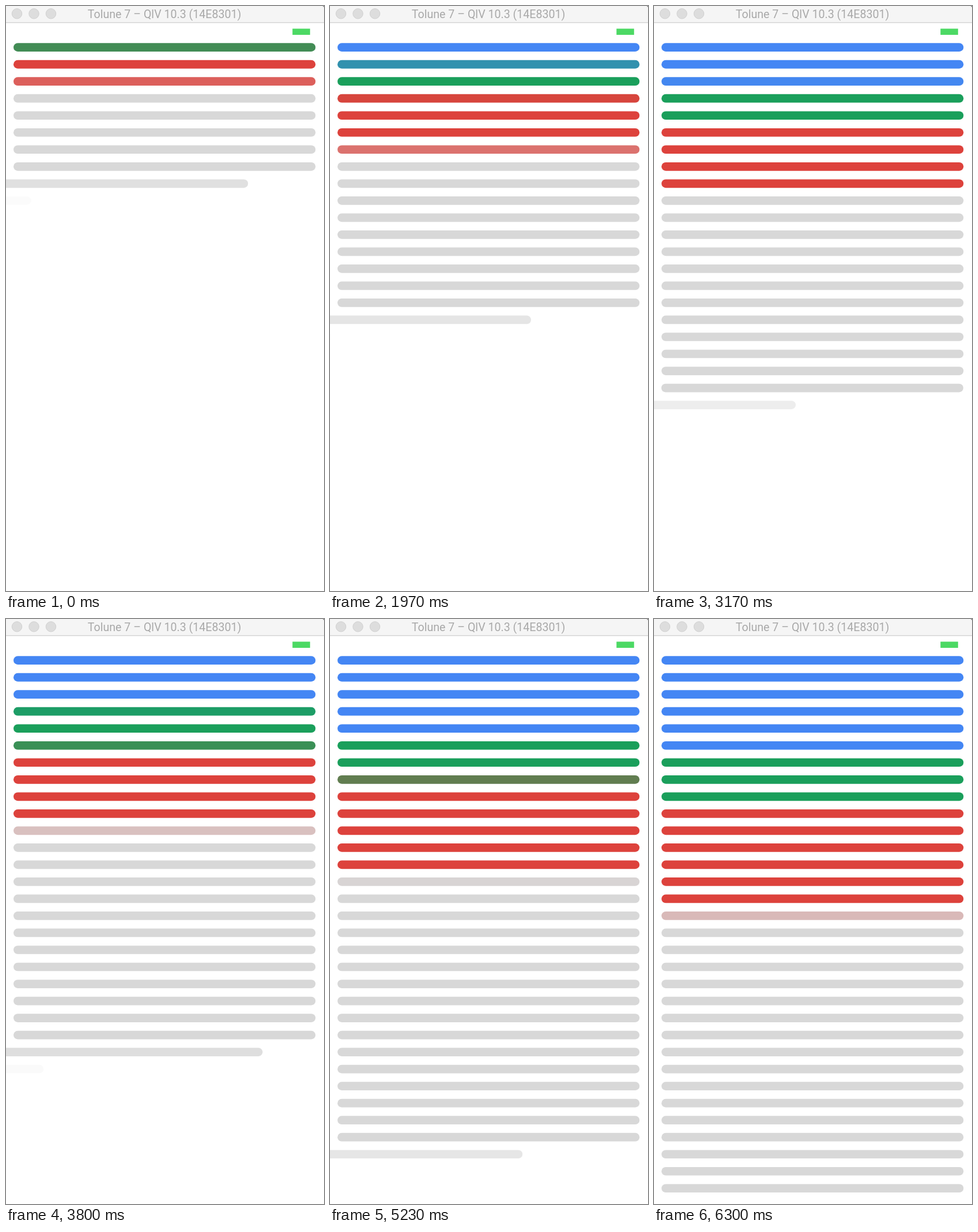
Write an HTML page with a canvas that moves like this. It is 552x1014 px and loops after 6.36 s.

```html
<!DOCTYPE html>
<html lang="en">
<head>
<meta charset="utf-8">
<title>Staggered bars</title>
<style>
  html, body { margin: 0; width: 100%; height: 100%; overflow: hidden; background: #fff; }
  canvas { display: block; }
</style>
</head>
<body>
<canvas id="stage" width="552" height="1014"></canvas>
<script>
const ctx = document.getElementById('stage').getContext('2d');

const LOOP = 6360, FRAME = 100 / 3, LAST_FRAME = 189;
const ROWS = 32, DURATION = 500;
const BAR = { x: 13, y: 64.3, width: 524.3, height: 14.7, pitch: 29.52 };
const SLIDE = 552;
const GREY = [216, 216, 216];

// Each wave reaches row i at start + i * stagger.
const ENTRY = { start: -2367, stagger: 252 };
const TINTS = [
  { start: -1366, stagger: 504, color: [221, 66, 60] },
  { start: -353, stagger: 756, color: [26, 159, 91] },
  { start: 695, stagger: 1008, color: [68, 134, 244] },
];

// Inverts x of cubic-bezier(.42, 0, 1, 1) by bisection and returns its y.
function easeIn(x) {
  let low = 0, high = 1;
  for (let i = 0; i < 20; i++) {
    const s = (low + high) / 2;
    if (1.26 * s + 0.48 * s * s - 0.74 * s ** 3 < x) low = s; else high = s;
  }
  return low * low * (3 - 2 * low);
}

function easeInOut(x) {
  if (x <= 0) return 0;
  if (x >= 1) return 1;
  return x < 0.5 ? easeIn(2 * x) / 2 : 1 - easeIn(2 - 2 * x) / 2;
}

const progress = (wave, row, time) =>
  easeInOut((time - wave.start - row * wave.stagger) / DURATION);

const mix = (from, to, amount) => from.map((v, i) => v + (to[i] - v) * amount);

function rect(color, x, y, width, height) {
  ctx.fillStyle = color;
  ctx.fillRect(x, y, width, height);
}

function drawWindow() {
  rect('#fff', 0, 0, 552, 1014);
  rect('#f5f5f5', 0, 0, 552, 28);
  rect('#d5d5d5', 0, 28, 552, 1.5);
  rect('#777', 550.5, 0, 1.5, 1.5);

  ctx.fillStyle = '#dddddd';
  ctx.strokeStyle = '#d0d0d0';
  ctx.lineWidth = 1;
  for (const x of [19, 48.5, 78]) {
    ctx.beginPath();
    ctx.arc(x, 13.3, 8.7, 0, Math.PI * 2);
    ctx.fill();
    ctx.stroke();
  }

  ctx.fillStyle = '#a9a9a9';
  ctx.font = '19.6px Roboto, sans-serif';
  ctx.textAlign = 'center';
  ctx.fillText('Tolune 7 – QlV 10.3 (14E8301)', 275, 20.7);

  rect('#4cd964', 497.3, 39.3, 30.5, 10.7);
}

function drawBar(row, time) {
  const shown = progress(ENTRY, row, time);
  if (!shown) return;
  const color = TINTS.reduce(
    (base, tint) => mix(base, tint.color, progress(tint, row, time)), GREY);
  ctx.globalAlpha = shown;
  ctx.fillStyle = `rgb(${color.map(Math.round)})`;
  ctx.beginPath();
  ctx.roundRect(BAR.x - SLIDE * (1 - shown), BAR.y + row * BAR.pitch,
    BAR.width, BAR.height, BAR.height / 2);
  ctx.fill();
  ctx.globalAlpha = 1;
}

// Thirty steps a second, on a 10 ms grid; the closing pose is held a little longer.
function stepTime(elapsed) {
  const frame = Math.floor((elapsed % LOOP + 3.4) / FRAME);
  return frame >= LAST_FRAME ? 6340 : frame * FRAME;
}

function draw() {
  const time = stepTime(performance.now() - began);
  drawWindow();
  for (let row = 0; row < ROWS; row++) drawBar(row, time);
  requestAnimationFrame(draw);
}

const began = performance.now();
draw();
</script>
</body>
</html>
```
